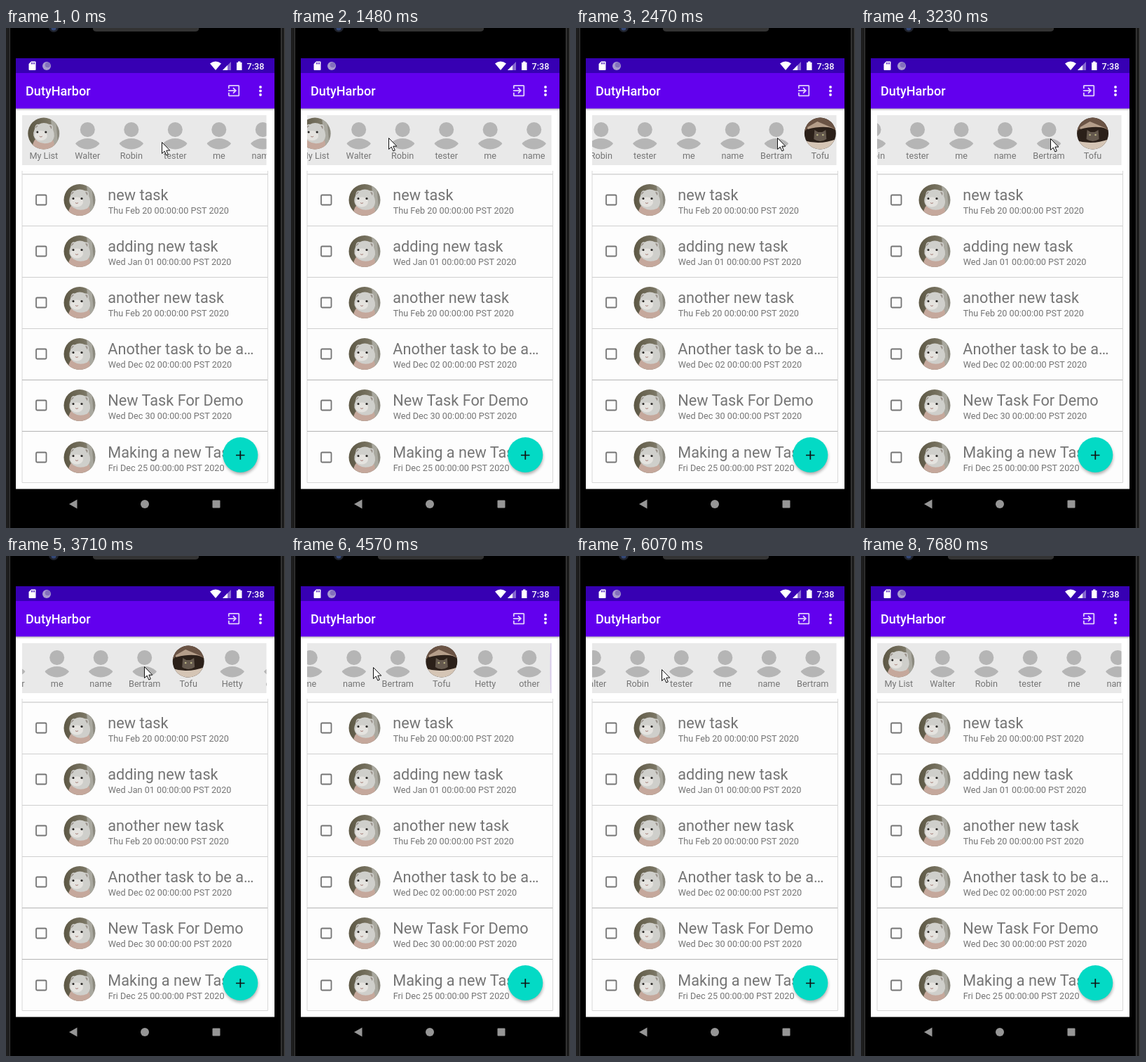
These frames come from a looping animation (398x711 px, 8110 ms). An HTML page:

```html
<!DOCTYPE html>
<html lang="en">
<head>
<meta charset="utf-8">
<title>Chore list</title>
<style>
html, body { margin: 0; width: 100%; height: 100%; overflow: hidden; background: #000; }
svg { display: block; width: 398px; height: 711px; font-family: Roboto, sans-serif; }
.title { font-size: 21.7px; }
.small { font-size: 12.66px; }
.title, .small { fill: #757575; }
.bar { font-weight: 500; fill: #fff; }
</style>
</head>
<body>
<svg viewBox="0 0 398 711">
  <defs>
    <clipPath id="round"><circle r="22.5"/></clipPath>
    <clipPath id="stripClip"><rect x="23" y="124" width="348.5" height="71"/></clipPath>
    <filter id="blur" x="-30%" y="-30%" width="160%" height="160%"><feGaussianBlur stdDeviation="2"/></filter>
    <linearGradient id="shade" x2="0" y2="1">
      <stop stop-color="#b4b4b4"/><stop offset="1" stop-color="#fff"/>
    </linearGradient>
    <linearGradient id="wall">
      <stop stop-color="#5c5744"/><stop offset=".6" stop-color="#777260"/><stop offset="1" stop-color="#8f8e84"/>
    </linearGradient>
    <g id="hamster" clip-path="url(#round)">
      <rect x="-23" y="-23" width="46" height="46" fill="url(#wall)"/>
      <path d="M10-23h7l4 46h-7z" fill="#a9a89f"/>
      <path d="M-17 23Q-15 5-5 5L11 7Q17 12 14 23z" fill="#c5a89c"/>
      <path d="M-13-6Q-12-15-7-13Q0-17 8-13Q14-14 13-6Q18 5 11 12Q0 17-9 11Q-18 4-13-6z" fill="#cfcfcb"/>
      <ellipse cx="-4" cy="3" rx="9" ry="7" fill="#e5e3df"/>
      <path d="M-12-7Q-11-13-8-11zM8-11Q13-12 11-6z" fill="#99918a"/>
      <circle cx="-9" cy="-2" r="1.5" fill="#282624"/><circle cx="3" cy="-2" r="1.6" fill="#282624"/>
      <path d="M-6 4l2 1 2-1" stroke="#a47c76" fill="none"/>
    </g>
    <g id="cat" clip-path="url(#round)">
      <rect x="-23" y="-23" width="46" height="46" fill="#2b2019"/>
      <path d="M-23-23H23V-4Q8-13-3-13T-23-2z" fill="#6b5445"/>
      <path d="M-18-9L-4-17 20-7Q4-12-18-6z" fill="#b59e8a"/>
      <path d="M-9 8L-8-5-3-2H3L8-5 9 8Q0 14-9 8z" fill="#65594e"/>
      <circle cx="-4" cy="2" r="1.3" fill="#b9b384"/><circle cx="4" cy="2" r="1.3" fill="#b9b384"/>
      <path d="M-23 10Q0 17 23 8V23H-23z" fill="#d5c5b5"/>
    </g>
    <g id="person" clip-path="url(#round)" fill="#b5b5b5">
      <circle cy="-5.5" r="10.5"/><ellipse cy="26" rx="22" ry="19"/>
    </g>
  </defs>

  <!-- phone body -->
  <path d="M0 0H6V711H0z" fill="#1d1d1d"/>
  <path d="M5.5 0V711" stroke="#3c3c3c"/>
  <path d="M392 0H398V711H392z" fill="#1d1d1d"/>
  <path d="M392.5 0V711M397.5 0V711" stroke="#484848"/>
  <path d="M124 0H275V2Q274 5 270 5H129Q125 5 124 2z" fill="#333"/>
  <circle cx="68" cy="-1" r="7" fill="#20242e"/><circle cx="68" cy="0" r="3.5" fill="#344878"/>
  <rect x="14" y="43" width="369" height="612.5" fill="#fff"/>

  <!-- bars -->
  <rect x="14" y="114" width="369" height="4" fill="url(#shade)"/>
  <rect x="14" y="43" width="369" height="21.5" fill="#3700b3"/>
  <rect x="14" y="64" width="369" height="50.5" fill="#6200ee"/>
  <path d="M36 47.5H41.5Q42.5 47.5 42.5 48.5V59Q42.5 60 41.5 60H33.5Q32.5 60 32.5 59V51z" fill="#fff"/>
  <path d="M36.5 49v2.5M38.5 49v2.5M40.5 49v2.5" stroke="#3700b3"/>
  <circle cx="58" cy="54" r="6" fill="#a99bd0"/>
  <circle cx="59.5" cy="52.5" r="3.8" fill="#8370bd"/>
  <path d="M291 50.5Q299 44.500 307 50.500L299 60z" fill="#fff"/>
  <path d="M321 48V60H309z" fill="#8769d0"/><path d="M316 53V60H309z" fill="#fff"/>
  <path d="M331 47.500h3.500V49H336.500V60H329V49h2z" fill="#fff"/>
  <text class="bar" x="343.500" y="58.500" font-size="12.6">7:38</text>
  <text class="bar" x="28" y="96" font-size="18.1">DutyHarbor</text>
  <path transform="translate(314.2 78.200) scale(.904)" fill="#e0d0fb" d="M10.090 15.590L11.500 17l5-5-5-5-1.410 1.410L12.670 11H3v2h9.670zM19 3H5c-1.110 0-2 .9-2 2v4h2V5h14v14H5v-4H3v4c0 1.100.89 2 2 2h14c1.100 0 2-.9 2-2V5c0-1.100-.9-2-2-2z"/>
  <g fill="#fff"><circle cx="363" cy="84" r="1.900"/><circle cx="363" cy="89.500" r="1.900"/><circle cx="363" cy="95" r="1.900"/></g>

  <!-- people -->
  <g clip-path="url(#stripClip)">
    <rect x="23" y="124" width="349" height="71" fill="#e9e9e9"/>
    <g id="people"></g>
    <ellipse id="glowLeft" cx="23" cy="159.500" ry="42" fill="#6200ee" opacity=".13"/>
    <ellipse id="glowRight" cx="371.500" cy="159.500" ry="42" fill="#6200ee" opacity=".13"/>
  </g>

  <!-- tasks -->
  <rect x="23" y="203" width="350.500" height="444" fill="#fdfdfd"/>
  <path d="M23 203V646.500H373.500V203" fill="none" stroke="#d8d8d8"/>
  <path d="M23 208H373" stroke="#dedede" stroke-width="2"/>
  <g id="tasks"></g>

  <!-- add button -->
  <circle cx="335" cy="610" r="24.500" fill="#000" opacity=".32" filter="url(#blur)"/>
  <circle cx="334.300" cy="607" r="25" fill="#03dac5"/>
  <path d="M328 607.500H340.500M334.300 601.300V613.700" stroke="#111" stroke-width="1.700"/>

  <!-- navigation -->
  <g fill="#969696"><path d="M90 677L101.500 670.500V683.500z"/><circle cx="198" cy="677" r="6"/><rect x="294.500" y="671.500" width="11" height="11" rx="1"/></g>

  <path id="cursor" d="M0 0V16L3.700 12.600 6.300 18.500 8.800 17.500 6.300 11.600H11.300z" fill="#fff" stroke="#111"/>
</svg>
<script>
const $ = id => document.getElementById(id);
const LOOP = 8110;

const people = ['My List', 'Walter', 'Robin', 'tester', 'me', 'name', 'Bertram', 'Tofu', 'Hetty', 'other'];
const icons = { 'My List': 'hamster', Tofu: 'cat' };
$('people').innerHTML = people.map((name, i) => `<g transform="translate(${53.8 + 62.5 * i} 150)">
  <use href="#${icons[name] || 'person'}"/><text class="small" y="36" text-anchor="middle">${name}</text></g>`).join('');

const tasks = [
  ['new task', 'Thu Feb 20'],
  ['adding new task', 'Wed Jan 01'],
  ['another new task', 'Thu Feb 20'],
  ['Another task to be a…', 'Wed Dec 02'],
  ['New Task For Demo', 'Wed Dec 30'],
  ['Making a new Task', 'Fri Dec 25']
];
$('tasks').innerHTML = tasks.map(([title, day], i) => `<g transform="translate(0 ${Math.round(73.1 * i)})">
  ${i < 5 ? `<path d="M23 281.5H373" stroke="${i < 3 ? '#cfcfcf' : '#b4b4b4'}"/>` : ''}
  <rect x="43" y="237.500" width="14.500" height="14" rx="1.500" fill="none" stroke="#757575" stroke-width="1.800"/>
  <use href="#hamster" x="105" y="244.500"/>
  <text class="title" x="145.300" y="244.500">${title}</text>
  <text class="small" x="145.700" y="264">${day} 00:00:00 PST 2020</text></g>`).join('');

// Keys: time, then values
const cursorKeys = [
  [0, 223, 162], [370, 223, 162], [720, 74, 134], [1000, 165, 157], [1250, 165, 157],
  [1480, 140, 156], [1800, 62, 156], [2010, 90, 157], [2470, 288, 156], [2700, 294, 157],
  [2950, 294, 157], [3710, 198, 157], [4570, 118, 158], [5110, 118, 158], [5590, 252, 160],
  [5840, 252, 160], [6070, 123, 161], [6600, 235, 161], [7000, 245, 340], [7270, 180, 553],
  [7370, 175, 549], [7620, 175, 549], [7680, 178, 549]
];
const scrollKeys = [
  [1270, 0], [1480, 19.5], [1800, 91], [2010, 118], [2430, 143], [2980, 143], [3710, 231],
  [4150, 276.5], [5130, 276.5], [5400, 155], [5590, 91], [6070, 91], [6480, 0]
];
const leftKeys = [[6440, 0], [6600, 8], [6900, 0]];
const rightKeys = [[4150, 0], [4570, 2], [5110, 2], [5200, 0]];

// Smooth curve through the keys, without overshoot
function sample(keys, t, col = 1) {
  const last = keys.length - 1;
  if (t <= keys[0][0]) return keys[0][col];
  if (t >= keys[last][0]) return keys[last][col];
  const slope = i => i < 0 || i >= last ? 0 : (keys[i + 1][col] - keys[i][col]) / (keys[i + 1][0] - keys[i][0]);
  const tangent = i => {
    const a = slope(i - 1), b = slope(i);
    return a * b > 0 ? 2 * a * b / (a + b) : 0;
  };
  const i = keys.findIndex(k => k[0] > t) - 1;
  const span = keys[i + 1][0] - keys[i][0], u = (t - keys[i][0]) / span;
  const ease = u * u * (3 - 2 * u);
  return keys[i][col] * (1 - ease) + keys[i + 1][col] * ease
    + span * u * (1 - u) * (tangent(i) * (1 - u) - tangent(i + 1) * u);
}

function draw() {
  const t = performance.now() % LOOP;
  $('people').setAttribute('transform', `translate(${-sample(scrollKeys, t)} 0)`);
  $('glowLeft').setAttribute('rx', sample(leftKeys, t));
  $('glowRight').setAttribute('rx', sample(rightKeys, t));
  const x = Math.round(sample(cursorKeys, t)), y = Math.round(sample(cursorKeys, t, 2));
  $('cursor').setAttribute('transform', `translate(${x - 0.5} ${y + 0.5})`);
  $('cursor').setAttribute('visibility', t < 7680 ? 'visible' : 'hidden');
  requestAnimationFrame(draw);
}
draw();
</script>
</body>
</html>
```
